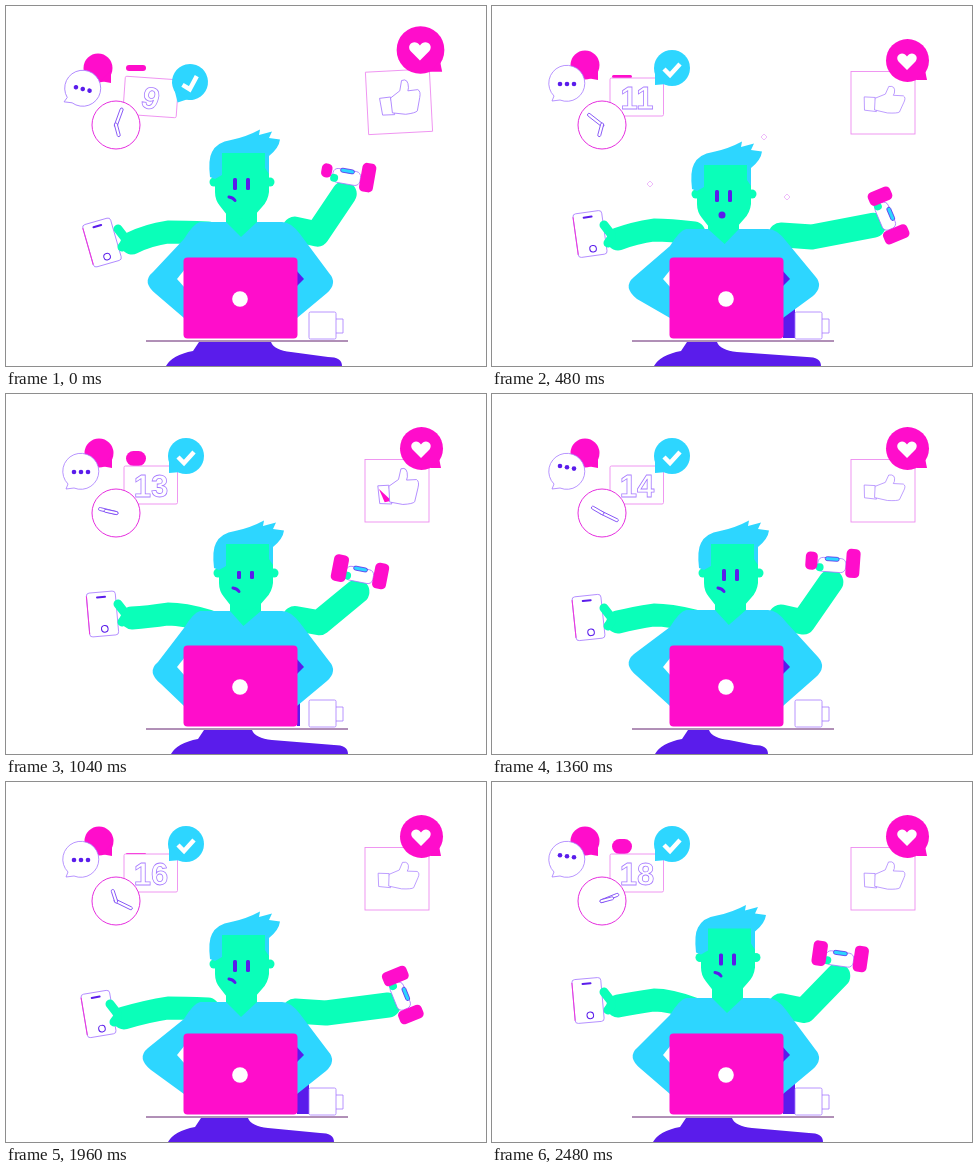
Animation, 480 px wide and 360 px high, one loop 2.52 s. Source, as an HTML page:

```html
<!DOCTYPE html>
<html lang="en">
<head>
<meta charset="utf-8">
<title>Multitasking at the desk</title>
<style>
  html, body { margin: 0; width: 100%; height: 100%; overflow: hidden; background: #fff; }
  svg { display: block; width: 100vw; height: 100vh; }
  .cyan { fill: #2dd6ff; }
  .green { fill: #0affb9; }
  .pink { fill: #ff0dcb; }
  .violet { fill: #5a1ceb; }
  .white { fill: #fff; }
  .skin { fill: none; stroke: #0affb9; stroke-linejoin: round; stroke-linecap: round; }
  .ink { fill: none; stroke: #5a1ceb; stroke-linecap: round; }
  .thin { fill: #fff; stroke: #a67aff; stroke-width: .8; }
  .rose { fill: #fff; stroke: #ee8cf0; stroke-width: .9; }
  #num { font: bold 31px "Liberation Sans", Arial, sans-serif; text-anchor: middle; }
</style>
</head>
<body>
<svg viewBox="0 0 480 360">
  <!-- left icons -->
  <g id="pinkChat">
    <circle class="pink" cx="93" cy="59" r="14.5"/>
    <path class="pink" d="M95 72L106 74L106 62Z"/>
  </g>
  <g id="chat">
    <path class="thin" d="M62 90L60 95L68 94A18 18 0 1 0 62 90Z"/>
    <g class="violet" id="dots">
      <circle cx="68" cy="78" r="2.3"/><circle cx="75" cy="78" r="2.3"/><circle cx="82" cy="78" r="2.3"/>
    </g>
  </g>
  <rect id="tab" class="pink" x="120" width="20"/>
  <g id="calendar">
    <rect class="rose" x="118" y="72" width="53.500" height="38" rx="1.500"/>
    <text id="num" class="thin" x="145" y="103"></text>
  </g>
  <g id="check">
    <circle class="cyan" cx="180" cy="62" r="18"/>
    <path class="cyan" d="M163 66L163 79L175 78Z"/>
    <path d="M172 63L178 69L188 58" fill="none" stroke="#fff" stroke-width="4.500"/>
  </g>
  <circle cx="110" cy="119" r="24" fill="#fff" stroke="#e62fdf"/>
  <g stroke="#7a45f5" stroke-width=".8" fill="#fff">
    <rect id="minute" x="108.500" y="101" width="3" height="20" rx="1.500"/>
    <rect id="hour" x="108.500" y="107" width="3" height="14" rx="1.500"/>
  </g>

  <!-- right icons -->
  <g id="likeCard">
    <rect class="rose" x="359" y="65.500" width="64" height="62.500"/>
    <g id="thumb">
      <path class="thin" d="M-19 -4L-8 -4L-6 14L-18 13Z"/>
      <path id="cuff" class="pink" d="M-18 -1L-13 12L-6 11Z"/>
      <path class="thin" d="M-8 -3L2 -9L5 -19Q12 -21 11 -11L10 -8H20Q23 -6 21 0L17 13Q15 15 5 15L-8 12Z"/>
    </g>
  </g>
  <g id="heart">
    <circle class="pink" cx="415.500" cy="54.500" r="21.500"/>
    <path class="pink" d="M424 74L435 74L433 64Z"/>
    <path class="white" d="M415 64L406.500 55.500C402 49 411 44 415 50.500C419 44 428 49 423.500 55.500Z"/>
  </g>
  <g id="sparks" fill="#fff" stroke="#eebcfa">
    <path d="M272 128l3 3l-3 3l-3 -3zM158 175l3 3l-3 3l-3 -3zM295 188l3 3l-3 3l-3 -3z"/>
  </g>

  <!-- arms -->
  <path id="armL" class="skin" stroke-width="23"/>
  <g id="phone">
    <rect class="thin" x="-14.500" y="-22" width="29" height="44" rx="3"/>
    <path d="M-14.500 -19V19" stroke="#ee35dc" fill="none"/>
    <path class="ink" stroke-width="2" d="M-4 -17H4"/>
    <circle class="ink" cx="1" cy="15" r="3.300"/>
  </g>
  <path id="grip" class="skin" stroke-width="9"/>
  <path id="armR" class="skin" stroke-width="25"/>
  <g id="bell">
    <rect class="thin" x="-14" y="-4" width="28" height="14" rx="5"/>
    <circle class="green" cx="-12" cy="6" r="4"/>
    <rect x="-7" y="-5" width="14" height="4" rx="2" fill="#2dd6ff" stroke="#5a1ceb" stroke-width=".7"/>
    <rect id="weightL" class="pink" rx="4.500"/>
    <rect id="weightR" class="pink" rx="4.500"/>
  </g>

  <!-- body -->
  <path id="legs" class="violet"/>
  <path id="chair" class="violet"/>
  <path id="torso" class="cyan"/>
  <path class="white" d="M179 263L171 273L179 282Z"/>
  <path class="violet" d="M290 264L298 273L290 281Z"/>
  <path id="neck" class="green"/>
  <g id="head">
    <circle class="green" cx="208" cy="176" r="4.500"/>
    <circle class="green" cx="264" cy="176" r="4.500"/>
    <path class="green" d="M209 145H263V186Q262 195 256 201L249 209Q235 217 221 209L214 200Q209 194 209 186Z"/>
    <path class="cyan" d="M204 171Q202 153 206 146Q211 136 225 134Q240 131 254 123.500L253 129L266 125.500L263 132L274 133.500Q273 142 263 150V168L259 162V147H216V169L209 173Z"/>
    <g class="violet" id="eyes">
      <rect x="227" y="172" width="4" height="12" rx="1.500"/>
      <rect x="240" y="172" width="4" height="12" rx="1.500"/>
    </g>
    <path id="smirk" class="ink" stroke-width="3" d="M223 191Q227 191.500 229 194.500"/>
    <circle id="gasp" class="violet" cx="234" cy="197" r="3.500"/>
  </g>

  <!-- desk -->
  <rect class="pink" x="177.500" y="251.500" width="114" height="81" rx="4"/>
  <circle class="white" cx="234" cy="293" r="7.800"/>
  <path class="thin" d="M330 313H337V327H330"/>
  <rect class="thin" x="303" y="306" width="27" height="27" rx="1.500"/>
  <path d="M140 335H342" stroke="#62206f"/>
</svg>
<script>
const LOOP = 2520, REP = LOOP / 2;
const POSE = [0, 480, 1040, 1360, 1680, 1960, 2480, LOOP];
const LIFT = [0, 100, 420, 480, 700, 1040, 1220, REP];
const el = {};
document.querySelectorAll('[id]').forEach(n => el[n.id] = n);
const dots = [...el.dots.children];

const set = (n, attrs) => { for (const k in attrs) n.setAttribute(k, attrs[k]); };
const move = (n, tf) => n.setAttribute('transform', tf);
const path = (n, d) => n.setAttribute('d', d);
const show = (n, on) => n.setAttribute('opacity', +on);

// Monotone cubic through looping keys
function curve(times, t, keys) {
  const v = [...keys, keys[0]], last = times.length - 1;
  let i = 0;
  while (i < last - 1 && t >= times[i + 1]) i++;
  const slope = j => (v[j + 1] - v[j]) / (times[j + 1] - times[j]);
  const tangent = j => {
    const a = slope(j ? j - 1 : last - 1), b = slope(j === last ? 0 : j);
    return a * b <= 0 ? 0 : 2 * a * b / (a + b);
  };
  const h = times[i + 1] - times[i], u = (t - times[i]) / h, w = 1 - u;
  return v[i] * w * w * (1 + 2 * u) + v[i + 1] * u * u * (3 - 2 * u)
    + h * u * w * (w * tangent(i) - u * tangent(i + 1));
}

// Icons jump at the loop start, with a small echo at the second rep
function pulse(t) {
  if (t < 200) return (1 - t / 200) ** 2;
  const d = Math.abs(t - REP) / 100;
  return d < 1 ? .25 * (1 - d) ** 2 : 0;
}

function icons(t, pose) {
  const p = pulse(t);
  move(el.pinkChat, `translate(${-p} ${3 * p})`);
  move(el.chat, `translate(${2 * p} ${5 * p}) rotate(${14 * p} 75 77)`);
  move(el.check, `translate(${4 * p} ${14 * p}) rotate(${-14 * p} 180 62)`);
  move(el.calendar, `rotate(${4 * p} 145 91)`);
  move(el.likeCard, `translate(${2 * p} ${-p}) rotate(${-3 * p} 391 97)`);
  move(el.heart, `translate(${-p} ${-10.5 * p}) translate(415.5 54.5) scale(${1 + .11 * p}) translate(-415.5 -54.5)`);

  const hop = pose(0, 0, 0, 1, 0, 0, .8);
  dots.forEach((d, i) => d.setAttribute('cy', 78 - hop * (6 - i * 1.3)));

  el.num.textContent = 9 + Math.round(t / 272);
  move(el.num, `rotate(${14 * p} 145 92)`);
  const h = pose(6, 3, 15, 1, 14, 2, 15);
  set(el.tab, { y: pose(65, 72, 72, 73, 72, 73, 72) - h, height: h, rx: Math.min(9, h / 2) });

  move(el.minute, `rotate(${20 + .6 * t} 110 119)`);
  move(el.hour, `rotate(${pose(165, 195, 282, 300, 325, 342, 435)} 110 119)`);

  move(el.thumb, `translate(391 95) rotate(${pose(-4, 3, -3, 3, 0, 2, 2)}) scale(1 ${pose(1, .78, 1.05, .75, .82, .78, .8)})`);
  show(el.cuff, Math.abs(t - 1040) < 100);
  show(el.sparks, Math.abs(t - 480) < 120);
}

function phoneArm(pose) {
  const x = pose(118, 118, 118, 118, 110, 110, 118);
  const y = pose(237, 233, 224, 228, 237, 236, 224);
  const bend = pose(226, 224, 220, 221, 226, 226, 218);
  path(el.armL, `M202 227Q178 ${bend} 162 ${bend}Q142 ${bend + 3} ${x + 8} ${y}`);
  path(el.grip, `M${x + 1} ${y - 5}L${x - 6} ${y - 14}M${x + 1} ${y}L${x - 2} ${y + 4}`);
  move(el.phone, `translate(${pose(96, 98, 96.5, 96.5, 92, 92.5, 96)} ${pose(236.5, 228, 220, 223.5, 231, 232, 218.5)})
    rotate(${pose(-16, -8, -5, -6, -8.5, -9.5, -5)})`);
}

function liftArm(t) {
  const lift = (...k) => curve(LIFT, t % REP, k);
  const x = lift(341, 340, 391, 396, 397, 354, 348);
  const y = lift(168, 168, 197, 209, 213, 178, 174);
  const tilt = lift(10, 4, 56, 67, 68, 11, 8);
  const a = tilt * Math.PI / 180, ext = (x - 340) / 57;
  const hx = x - 16 * Math.sin(a), hy = y + 16 * Math.cos(a);
  path(el.armR, `M289 ${223 + 6 * ext}L${311 + 9 * ext} ${228 + 3 * ext}L${hx} ${hy + 4}`);
  move(el.bell, `translate(${x} ${y}) rotate(${tilt})`);
  const l = lift(14, 18, 20, 24, 26, 27, 25), r = lift(29, 29, 24, 26, 25, 26, 26);
  const lw = 6 + l / 3;
  set(el.weightL, { x: -20.5 - lw / 2, y: -l / 2, width: lw, height: l });
  set(el.weightR, { x: 14, y: -r / 2, width: 14, height: r });
}

function body(t, pose) {
  const dx = pose(0, -4, 4, 3, -6, 0, 0), dy = pose(0, 12, 3, 3, 6.5, 6, -.5);
  const s = pose(0, 7, 1, 0, 3, 4, 0), top = 216 + s;
  const lx = pose(142, 137, 147, 137, 135, 137, 141), ly = pose(275, 280, 277, 269, 276, 275, 274);
  const rx = pose(328, 328, 328, 331, 328, 327, 328), ry = pose(275, 278, 275, 271, 274, 277, 275);
  path(el.torso, `M194 ${top}H276Q285 ${top} 294 ${top + 12}L${rx - 5} ${ry - 8}
    Q${rx + 4} ${ry + 2} ${rx - 7} ${ry + 12}L291 312H178L${lx + 8} ${ly + 13}
    Q${lx - 7} ${ly + 1} ${lx + 5} ${ly - 9}L178 ${top + 17}Q187 ${top + 2} 194 ${top}Z`);
  path(el.neck, `M${220 + dx} ${200 + dy}V${top}L${235 + dx * .6} ${top + 15}L${251 + dx} ${top}V${200 + dy}Z`);
  move(el.head, `translate(${dx} ${dy})`);
  move(el.eyes, `translate(0 178) scale(1 ${pose(1, 1, .67, 1, 1, 1, 1)}) translate(0 -178)`);
  const gasp = t > 300 && t < 760;
  show(el.gasp, gasp);
  show(el.smirk, !gasp);

  const seat = 291 + pose(0, 12, 3, 0, 12, 12, 12);
  path(el.chair, `M291 298H${seat}V332H291Z`);
  const a = pose(160, 162, 165, 163, 162, 162, 161);
  const b = pose(265, 225, 246, 217, 258, 242, 240);
  const c = pose(336, 329, 342, 276, 335, 328, 331);
  path(el.legs, `M${a} 360Q${a + 6} 349 ${a + 27} 345L${a + 33} 336H${b}Q${b + 3} 344 ${b + 20} 346
    L${c - 14} 351Q${c} 351 ${c} 360Z`);
}

function frame(now) {
  const t = now % LOOP;
  const pose = (...k) => curve(POSE, t, k);
  icons(t, pose);
  phoneArm(pose);
  liftArm(t);
  body(t, pose);
}

let start;
function tick(now) {
  start ??= now;
  frame(now - start);
  requestAnimationFrame(tick);
}
frame(0);
requestAnimationFrame(tick);
</script>
</body>
</html>
```
